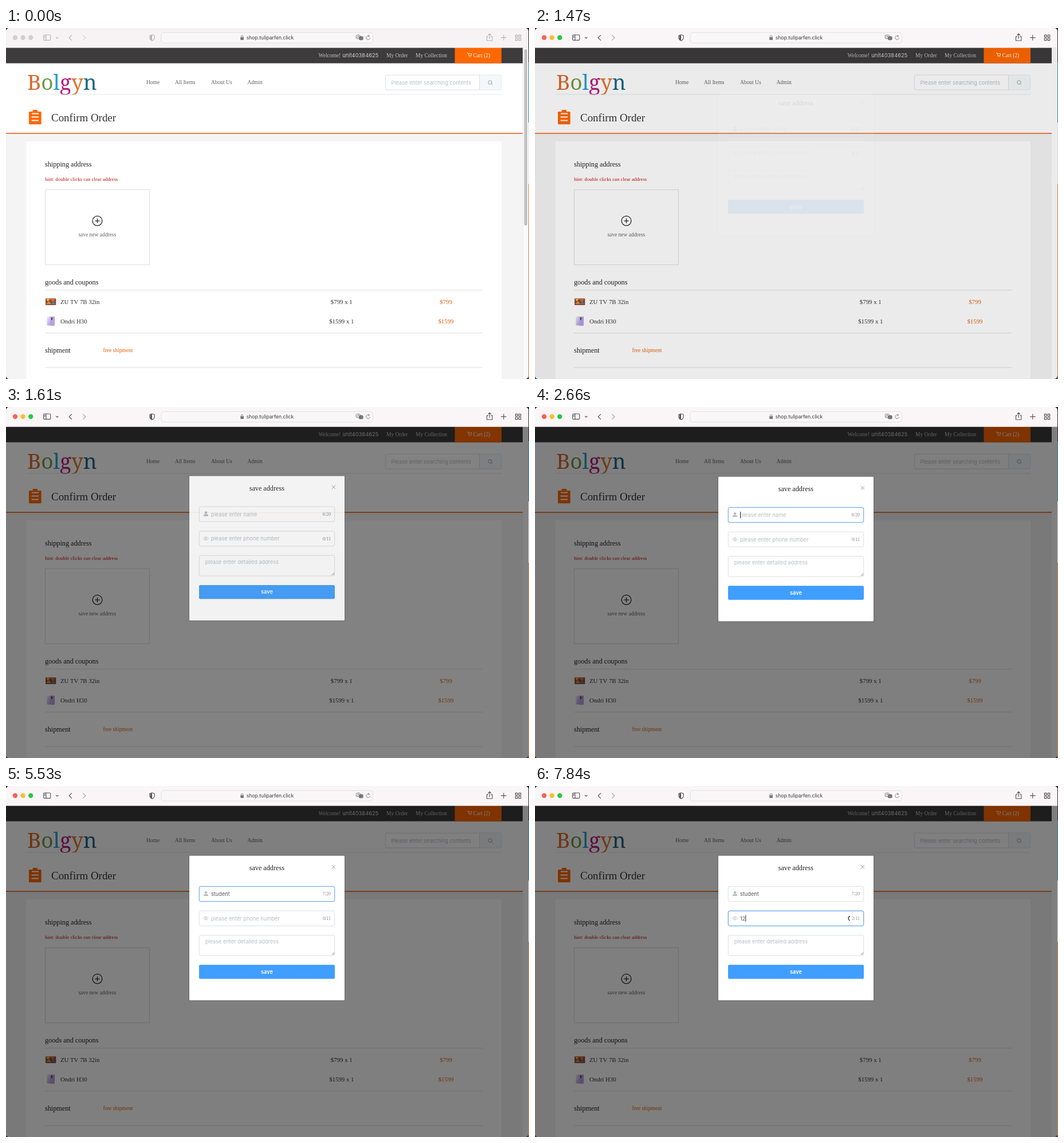
An HTML page for the animation above (8 s loop, 913 by 613 pixels).

```html
<!DOCTYPE html>
<html lang="en">
<head>
<meta charset="utf-8">
<title>Confirm Order</title>
<style>
  html, body { margin: 0; width: 100%; height: 100%; overflow: hidden; background: #3c2328; }
  svg { display: block; width: 913px; height: 613px; }
  text { font: 9.48px "Liberation Serif", serif; fill: #333; white-space: pre; }
  .ui { font: 9.2px Inter, sans-serif; }
  .h2 { font-size: 12.19px; fill: #222; }
  .row { font-size: 10.83px; }
  .mid { text-anchor: middle; }
  .orange { fill: #e2620c; }
  .top { fill: #c4c4c4; }
  .nav { fill: #616161; }
  .hint { font-size: 8.8px; fill: #c4100c; }
  .ph { fill: #b9bcc3; }
  .value { fill: #55575b; }
  .count { font-size: 8.12px; fill: #808389; text-anchor: end; }
  .logo { font: 500 37px "Noto Serif", serif; }
  .line { fill: none; stroke: #dedede; }
  .field { fill: #fff; stroke: #dcdfe6; }
  .focus { fill: none; stroke: #409eff; stroke-width: .85; }
  .bar { fill: #faf6f8; }
  .icons { fill: none; stroke: #575456; stroke-width: 1.15; stroke-linecap: round; stroke-linejoin: round; }
  .away .bar { fill: #f7f3f5; }
  .away .icons { stroke: #b6b2b4; }
  .away .light { fill: #d2ced0; }
  .soft { opacity: .5; }
</style>
</head>
<body>
<svg viewBox="0 0 913 613">
  <defs>
    <clipPath id="window"><rect width="912" height="613" rx="6"/></clipPath>
    <linearGradient id="phone" x2="1" y2="1">
      <stop stop-color="#f2ecfb"/><stop offset="1" stop-color="#a692d6"/>
    </linearGradient>
  </defs>

  <!-- desktop edge -->
  <path d="M912.5 60V165" stroke="#2b7fae"/>
  <path d="M912.5 165V272" stroke="#dcdcdc"/>
  <path d="M912.5 272V613" stroke="#d67a43"/>

  <g clip-path="url(#window)">
    <rect width="912" height="613" fill="#fff"/>

    <!-- top bar -->
    <rect y="34" width="902" height="27.6" fill="#3d3b3b"/>
    <rect x="783.5" y="34" width="81.5" height="27.6" fill="#ff6700"/>
    <text class="top" x="545.5" y="51.3">Welcome!</text>
    <text class="ui" x="587.3" y="51.2" style="font-size:9.4px;fill:#d2d2d2">unit40384625</text>
    <text class="top" x="664" y="51.3">My Order</text>
    <text class="top" x="715" y="51.3">My Collection</text>
    <g fill="none" stroke="#fff" stroke-width=".9">
      <path d="M805 43.5h1.6l1.6 5.2h3.6l1.2-3.8h-5.6"/>
      <path d="M808 50.6h1M811 50.6h1"/>
    </g>
    <text x="815.5" y="51.3" style="fill:#fff">Cart (2)</text>

    <!-- header -->
    <text class="logo" x="37" y="108"><tspan fill="#d9682b">B</tspan><tspan fill="#6f9a45">o</tspan><tspan fill="#2a9fd0">l</tspan><tspan fill="#b51d80">g</tspan><tspan fill="#e0752c">y</tspan><tspan fill="#1d6688">n</tspan></text>
    <text class="nav" x="245" y="98.3">Home</text>
    <text class="nav" x="295" y="98.3">All Items</text>
    <text class="nav" x="358" y="98.3">About Us</text>
    <text class="nav" x="421.5" y="98.3">Admin</text>
    <rect class="field" x="662.3" y="82.1" width="202.5" height="26" rx="2.7"/>
    <path d="M826.5 82.6H862a2.4 2.4 0 0 1 2.4 2.4v20.2a2.4 2.4 0 0 1-2.4 2.4H826.5z" fill="#f4f8fa"/>
    <path d="M826.5 82V108" class="line" style="stroke:#dcdfe6"/>
    <text class="ui ph" x="672.5" y="98.7">Please enter searching contents</text>
    <g fill="none" stroke="#909399" stroke-width=".9"><circle cx="845" cy="95" r="3.2"/><path d="M847.4 97.4l2 2"/></g>
    <path class="line" d="M36 116H865" style="stroke:#e6e6e6"/>

    <!-- page title -->
    <g fill="#ff6700">
      <rect x="40" y="146" width="21.6" height="22.2" rx="1.2"/>
      <rect x="46.6" y="143" width="8.4" height="6" rx="1"/>
    </g>
    <path d="M45 149.5H57M44.5 155.5H57M44.5 161.5H57" stroke="#fff" stroke-width="2"/>
    <text x="79" y="162.6" style="font-size:18.96px">Confirm Order</text>

    <!-- order -->
    <rect y="184" width="902" height="429" fill="#f4f4f4"/>
    <rect y="183.2" width="902" height="1.6" fill="#e8631a"/>
    <rect x="35.5" y="198" width="829.5" height="415" fill="#fff"/>
    <text class="h2" x="68" y="241.7">shipping address</text>
    <text class="hint" x="68" y="267.4">hint: double clicks can clear address</text>
    <rect class="line" x="68.5" y="282.5" width="182" height="131"/>
    <g fill="none" stroke="#222" stroke-width="1.3"><circle cx="159.5" cy="336.8" r="8.4"/><path d="M155.5 336.8h8M159.5 332.8v8"/></g>
    <text class="mid" x="159.3" y="364" style="fill:#666">save new address</text>
    <text class="h2" x="68" y="448">goods and coupons</text>
    <path class="line" d="M68 457.8H832M68 532.8H832M68 593H832"/>
    <g>
      <rect x="69" y="472.3" width="18.3" height="11.6" fill="#8a4a3c"/>
      <path d="M70 473h7l-4 5z" fill="#e6b93a"/><path d="M77 473h9l-4 6z" fill="#e0663a"/>
      <path d="M70 482l5-5 4 5z" fill="#e08a4a"/><path d="M79 482l4-4 3 4z" fill="#4f8f9a"/>
    </g>
    <rect x="71.3" y="504" width="7.5" height="15.5" rx="1" fill="url(#phone)"/>
    <rect x="77.5" y="504" width="7.5" height="16" rx="1" fill="#b3a2de"/>
    <rect x="79" y="505.5" width="2" height="4.5" rx="1" fill="#413560"/>
    <text class="row" x="95" y="481.8">ZU TV 7B 32in</text>
    <text class="row" x="95" y="515.6">Ondri H30</text>
    <text class="row mid" x="585.8" y="481.8">$799 x 1</text>
    <text class="row mid" x="585.8" y="515.6">$1599 x 1</text>
    <text class="row mid orange" x="768" y="481.8">$799</text>
    <text class="row mid orange" x="768" y="515.6">$1599</text>
    <text class="h2" x="68" y="567.2">shipment</text>
    <text class="orange" x="169.5" y="566">free shipment</text>

    <g id="scrollbar">
      <rect x="902" y="34" width="10" height="579" fill="#fafafa"/>
      <path d="M902.5 34V613" stroke="#ececec"/>
      <rect x="904.6" y="37" width="5.4" height="308" rx="2.7" fill="#c1c1c1"/>
    </g>

    <rect id="shade" y="34" width="912" height="579"/>

    <!-- dialog -->
    <g id="dialog">
      <rect x="320" y="121.8" width="271" height="252.4" rx="1.4" fill="#fff" style="filter:drop-shadow(0 .7px 1.2px rgba(0,0,0,.35))"/>
      <text class="h2 mid" x="455.3" y="147.2">save address</text>
      <path d="M568.8 138.1l6.2 6.2M575 138.1l-6.2 6.2" stroke="#909399" stroke-width=".9"/>

      <rect class="field" x="337.3" y="175.4" width="236.4" height="26.2" rx="2.7"/>
      <rect class="focus" id="focusName" x="337.3" y="175.4" width="236.4" height="26.2" rx="2.7"/>
      <g fill="#b9bcc3"><circle cx="349" cy="186" r="2.3"/><path d="M345 192v-1.3q0-2 2-2h4q2 0 2 2V192z"/></g>
      <text class="ui" id="name" x="358" y="192"></text>
      <text class="count" id="nameCount" x="567" y="191.4"></text>

      <rect class="field" id="phoneBox" x="337.3" y="218.1" width="236.4" height="26.2" rx="2.7"/>
      <rect class="focus" id="focusPhone" x="337.3" y="218.1" width="236.4" height="26.2" rx="2.7"/>
      <g fill="none" stroke="#b9bcc3" stroke-width=".8"><path d="M344.4 231q4.5-6 9 0q-4.5 6-9 0z"/><circle cx="348.9" cy="231" r="1.5"/></g>
      <text class="ui" id="phoneText" x="358" y="234.6"></text>
      <path id="fillIcon" d="M549.8 227.4C546 229 546.3 233.4 549.8 235.2" fill="none" stroke="#222" stroke-width="1.2"/>
      <text class="count" id="phoneCount" x="567" y="234.1"></text>

      <rect class="field" x="337.3" y="260.7" width="236.4" height="35.6" rx="2.7"/>
      <text class="ui ph" x="347.8" y="275">please enter detailed address</text>
      <path d="M568.6 295l4.6-4.6M571 295l2.2-2.2" stroke="#777" stroke-width=".8"/>

      <rect x="337" y="312.3" width="237" height="24.4" rx="2" fill="#409eff"/>
      <text class="ui mid" x="455.4" y="327.8" style="font-weight:600;fill:#fff">save</text>
      <rect id="caret" width="1" height="11.4" fill="#333"/>
    </g>

    <!-- browser bar -->
    <g id="browser">
      <rect class="bar" width="912" height="34.5"/>
      <path d="M0 34.3H912" stroke="#dcd8da" stroke-width=".6"/>
      <circle class="light" cx="16" cy="16.8" r="4.2" fill="#fe5f57"/>
      <circle class="light" cx="29.6" cy="16.8" r="4.2" fill="#febc2e"/>
      <circle class="light" cx="43.2" cy="16.8" r="4.2" fill="#28c840"/>
      <rect x="271" y="8" width="369.5" height="18.3" rx="4.5" fill="#faf7f8" stroke="#dfdbdd" stroke-width=".9"/>
      <g class="icons">
        <rect x="65.6" y="12" width="12.2" height="9.4" rx="1.6"/><path d="M69.9 12v9.4M67.2 14.4h1M67.2 16.4h1"/>
        <path d="M87.4 16.1l1.9 1.9 1.9-1.9M114.6 12.7l-4.4 4.3 4.4 4.3"/>
        <path class="soft" d="M134.5 12.7l4.4 4.3-4.4 4.3"/>
        <path d="M255 11.8l4.2 1.5v3.6q0 3.4-4.2 5.3q-4.2-1.9-4.2-5.3v-3.6z"/>
        <path d="M253 14v5.5M254 13.4v7.2" stroke-width="2"/>
        <path d="M841.5 14.8h-2v7.2h9.4v-7.2h-2M844.2 18.4v-8.2M841.8 12.4l2.4-2.4 2.4 2.4"/>
        <path d="M864.4 16.8h8.8M868.8 12.4v8.8"/>
        <path d="M889.4 12.3h3.6v3.6h-3.6zM895.2 12.3h3.6v3.6h-3.6zM889.4 18h3.6v3.6h-3.6zM895.2 18h3.6v3.6h-3.6z"/>
      </g>
      <g fill="none" stroke="#777" stroke-width=".9">
        <rect x="611.3" y="12.2" width="7" height="6.4" rx="1.6"/><path d="M613 17l1.8-3.4 1.8 3.4"/>
        <rect x="616.4" y="14.8" width="6.8" height="6" rx="1.6" fill="#777"/>
        <path d="M634.6 14.7a3.4 3.4 0 1 0 .9 2.5M632.4 12l2.3 2.2-2.5 1.6"/>
        <path d="M410.5 16.4v-1.3a1.7 1.7 0 0 1 3.4 0v1.3"/><rect x="409.8" y="16.6" width="4.8" height="3.8" fill="#777"/>
      </g>
      <text class="ui" x="419.7" y="20.2" style="font-size:8.65px;fill:#3b393a">shop.tuliparfen.click</text>
    </g>
  </g>
</svg>
<script>
  const LOOP = 8000, OPEN = 1470, STEP = 70;
  const FOCUS_NAME = 2520, FOCUS_PHONE = 6300;
  const shadeSteps = [.08, .42, .49, .5, .5];
  const dialogSteps = [.09, .67, .9, .98, 1];
  const nameKeys = [3710, 3780, 4060, 4200, 4690, 4900, 4970];
  const phoneKeys = [7700, 7770];
  const caretOn = [[2520, 3010], [3430, 5530], [5950, 6860], [7490, LOOP]];

  const el = id => document.getElementById(id);
  const show = (id, on) => { el(id).style.visibility = on ? 'visible' : 'hidden'; };
  const ramp = (t, from, length) => Math.min(1, Math.max(0, (t - from) / length));

  function fill(id, countId, value, keys, hint, max, t) {
    const n = keys.filter(k => t >= k).length;
    const node = el(id);
    node.textContent = n ? value.slice(0, n) : hint;
    node.setAttribute('class', n ? 'ui value' : 'ui ph');
    el(countId).textContent = `${n}/${max}`;
    return n ? node.getComputedTextLength() : 0;
  }

  function render(t) {
    el('browser').classList.toggle('away', t < 840);
    show('scrollbar', t < OPEN);

    const step = Math.min(4, Math.floor((t - OPEN) / STEP));
    const open = step < 0 ? 0 : dialogSteps[step];
    el('shade').style.opacity = step < 0 ? 0 : shadeSteps[step];
    el('dialog').style.opacity = open;
    el('dialog').setAttribute('transform', `translate(0 ${-13.5 * (1 - open)})`);

    const leave = ramp(t, FOCUS_PHONE, 210);
    el('focusName').style.opacity = ramp(t, FOCUS_NAME, 140) - leave;
    el('focusPhone').style.opacity = leave;
    el('phoneBox').style.stroke = t >= 6160 ? '#c0c4cc' : '';

    const nameWidth = fill('name', 'nameCount', 'student', nameKeys, 'please enter name', 20, t);
    const phoneWidth = fill('phoneText', 'phoneCount', '12', phoneKeys, 'please enter phone number', 11, t);
    const onPhone = t >= FOCUS_PHONE;
    show('fillIcon', onPhone);
    show('caret', caretOn.some(([a, b]) => t >= a && t < b));
    el('caret').setAttribute('x', 358 + (onPhone ? phoneWidth : nameWidth));
    el('caret').setAttribute('y', onPhone ? 225.4 : 182.8);
  }

  const start = performance.now();
  function tick() {
    render((performance.now() - start) % LOOP);
    requestAnimationFrame(tick);
  }
  tick();
</script>
</body>
</html>
```
